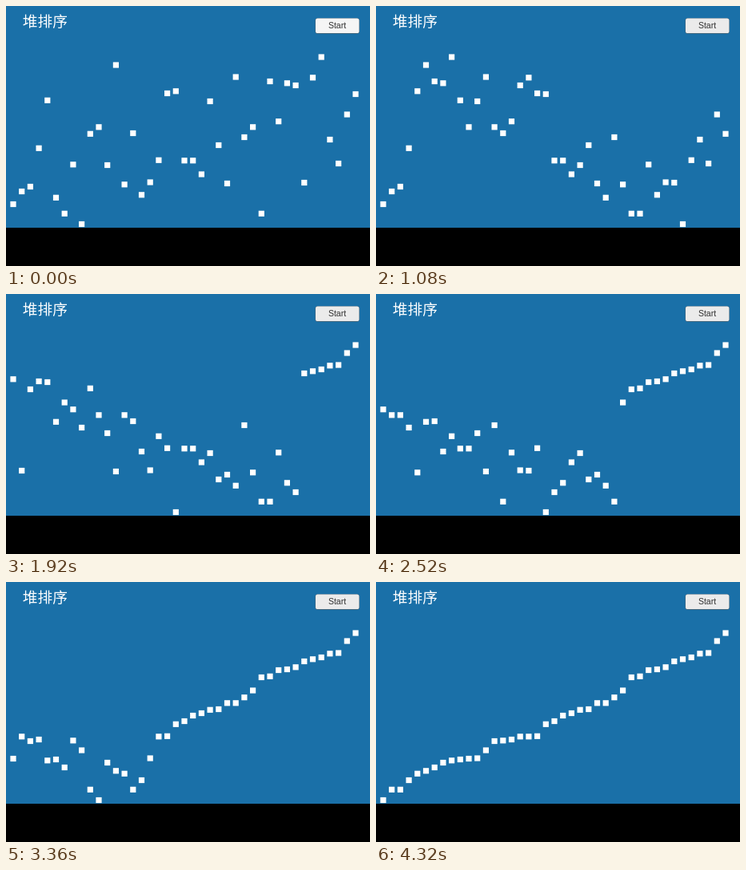
Recreate the animation shown at these times as an HTML page. Size 455 by 326 pixels, loop 5.88 s.

```html
<!DOCTYPE html>
<html lang="zh">
<head>
<meta charset="utf-8">
<title>堆排序</title>
<style>
  html, body { margin: 0; width: 100%; height: 100%; overflow: hidden; background: #000; }
  svg { display: block; width: 455px; height: 326px; }
  .title { font: 18.7px "Noto Sans CJK SC", "Noto Sans CJK", sans-serif; fill: #fff; }
  .label { font: 10.5px "Liberation Sans", Arial, sans-serif; fill: #323232; text-anchor: middle; }
</style>
</head>
<body>
<svg viewBox="0 0 455 326">
  <rect width="455" height="278" fill="#1a70a8"/>
  <g id="dots" fill="#fff"></g>
  <rect y="278" width="455" height="48"/>
  <text class="title" x="20.8" y="26">堆排序</text>
  <rect x="386.5" y="15.2" width="55.3" height="19.6" rx="3" fill="#4f6472"/>
  <rect id="button" x="387" y="15.4" width="54.4" height="18.6" rx="2.6" fill="#f5f5f5"/>
  <text class="label" x="414" y="28.3">Start</text>
</svg>
<script>
  const LOOP = 5880, START = 780, TICK = 60, LAST = 59;
  const SWAPS_PER_TICK = 3.125;
  const SIZE = 7.2, LEFT = 9, GAP = 10.7;

  // Vertical centres of the unsorted points; a smaller y is a larger value.
  const points = [
    248.5, 232.5, 226.5, 178.3, 118.3, 240.3, 260.3, 198.8, 273.5, 160.3,
    151.8, 199.5, 74, 223.8, 159.5, 236.8, 221, 193.3, 109.5, 106.8,
    193.8, 193.8, 211, 119.5, 174.5, 222.5, 89, 164.5, 151.8, 260.3,
    94.5, 144.7, 96.8, 99.5, 221.5, 89.8, 64, 167.5, 197.5, 136, 110.5
  ];

  // Heap sort, yielding after every swap.
  function* heapSort(a) {
    function* swap(i, j) {
      [a[i], a[j]] = [a[j], a[i]];
      yield;
    }
    function* sift(i, size) {
      for (;;) {
        let top = i;
        for (const child of [2 * i + 1, 2 * i + 2]) {
          if (child < size && a[child] < a[top]) top = child;
        }
        if (top === i) return;
        yield* swap(i, top);
        i = top;
      }
    }
    for (let i = (a.length >> 1) - 1; i >= 0; i--) yield* sift(i, a.length);
    for (let end = a.length - 1; end > 0; end--) {
      yield* swap(0, end);
      yield* sift(0, end);
    }
  }

  const states = [points.slice()];
  const work = points.slice();
  for (const _ of heapSort(work)) states.push(work.slice());

  const group = document.getElementById('dots');
  const button = document.getElementById('button');
  const dots = points.map((_, i) => {
    const dot = document.createElementNS('http://www.w3.org/2000/svg', 'rect');
    dot.setAttribute('width', SIZE);
    dot.setAttribute('height', SIZE);
    dot.setAttribute('x', (LEFT + GAP * i - SIZE / 2).toFixed(2));
    return group.appendChild(dot);
  });

  function buttonColor(tick) {
    if (tick < 0) return '#f5f5f5';
    return tick === 0 ? '#d6d6d6' : '#ebebeb';
  }

  function draw(time) {
    const tick = Math.min(LAST, Math.floor((time - START) / TICK));
    const swaps = tick < 0 ? 0 : 2 + Math.floor(tick * SWAPS_PER_TICK);
    const state = states[Math.min(swaps, states.length - 1)];
    dots.forEach((dot, i) => dot.setAttribute('y', (state[i] - SIZE / 2).toFixed(2)));
    button.setAttribute('fill', buttonColor(tick));
  }

  const begin = performance.now();
  function loop() {
    draw((performance.now() - begin) % LOOP);
    requestAnimationFrame(loop);
  }
  loop();
</script>
</body>
</html>
```
